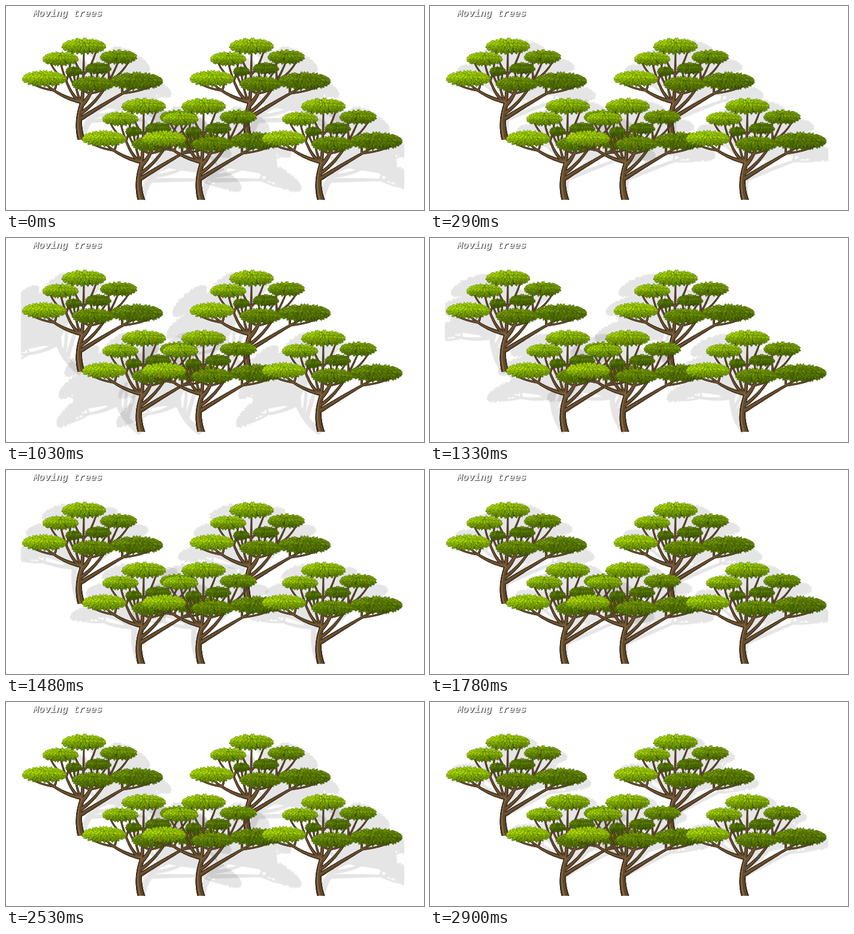
An HTML page with a canvas for the animation above (3000 ms loop, 698 by 340 pixels).

```html
<!DOCTYPE html>
<html lang="en">
<head>
<meta charset="utf-8">
<title>Moving trees</title>
<style>
  html, body { margin: 0; width: 698px; height: 340px; overflow: hidden; background: #fff; }
  canvas { display: block; }
</style>
</head>
<body>
<canvas id="stage" width="698" height="340"></canvas>
<script>
const W = 698, H = 340, LOOP = 3000;
const TREES = [[0, 0], [280, 0], [100, 100], [200, 100], [400, 100]];
const BASE = { x: 128, y: 222.5 }, CROTCH = { x: 128, y: 160 };

// Foliage from back to front; the five from index 2 run round the crown.
const CLUMPS = [
  [113, 109, 14, .36], [154, 104, 22, .36],
  [64, 121, 37, .98], [91, 88, 30, .86], [130, 67, 37, .84], [188, 85, 31, .58], [218, 125, 44, .42],
  [145, 130, 35, .5]
].map(([x, y, rx, bright]) => ({ x, y, rx, ry: rx * .23 + 5.5, bright }));

let seed = 7;
const random = () => (seed = seed * 16807 % 2147483647) / 2147483647;
const mix = (a, b, t) => a + (b - a) * t;

function layer() {
  const c = document.createElement('canvas');
  c.width = 290;
  c.height = 240;
  return c.getContext('2d');
}

const point = ({ from, via, to }, t) => ({
  x: mix(mix(from.x, via.x, t), mix(via.x, to.x, t), t),
  y: mix(mix(from.y, via.y, t), mix(via.y, to.y, t), t)
});

// A trunk, then one branch per clump, each ending in a fork of two twigs.
function growLimbs() {
  const trunk = { from: { x: 127, y: 226 }, via: { x: 116, y: 195 }, to: CROTCH, w0: 12, w1: 7 };
  const limbs = [trunk];
  for (const { x, y, rx, ry } of CLUMPS) {
    const reach = x - CROTCH.x;
    const branch = {
      from: { x: CROTCH.x - 2, y: CROTCH.y + Math.max(0, reach) * .3 },
      via: { x: CROTCH.x + reach * .6, y: CROTCH.y - 8 },
      to: { x, y: y + ry * .5 },
      w0: 2 + rx * .11, w1: 2.5
    };
    limbs.push(branch);
    for (const side of [-.55, .55]) {
      const from = point(branch, .7), to = { x: x + rx * side, y: y + ry * .6 };
      limbs.push({ from, via: { x: mix(from.x, to.x, .6), y: mix(from.y, to.y, .3) }, to, w0: 3, w1: 2 });
    }
  }
  return limbs;
}

function drawLimb(g, limb, colour, scale, grow, shift) {
  g.fillStyle = colour;
  for (let t = 0; t <= 1; t += .015) {
    const p = point(limb, t), w = mix(limb.w0, limb.w1, t);
    g.beginPath();
    g.arc(p.x + shift * w, p.y + shift * w * .3, w * scale / 2 + grow, 0, 7);
    g.fill();
  }
}

function leaf(g, x, y, angle, length, light) {
  g.save();
  g.translate(x, y);
  g.rotate(angle);
  g.beginPath();
  g.moveTo(-length * .5, 0);
  g.quadraticCurveTo(0, -length * .5, length * .5, 0);
  g.quadraticCurveTo(0, length * .5, -length * .5, 0);
  g.fillStyle = `hsl(${77 - light * 5}, 95%, ${13 + light * 31}%)`;
  g.strokeStyle = `hsl(80, 95%, ${9 + light * 18}%)`;
  g.lineWidth = .6;
  g.fill();
  g.stroke();
  g.restore();
}

// Rings of leaves pointing outwards, laid from the rim to the middle.
function drawClump(g, { x, y, rx, ry, bright }) {
  g.fillStyle = `hsl(80, 90%, ${10 + bright * 8}%)`;
  g.beginPath();
  g.ellipse(x, y, rx * .85, ry * .8, 0, 0, 7);
  g.fill();
  const length = 6 + ry * .25;
  for (let ring = 1; ring > -.01; ring -= .2) {
    const count = Math.max(2, Math.round(ring * (rx + ry) * .66));
    for (let i = 0; i < count; i++) {
      const a = (i + random() * .7) / count * Math.PI * 2;
      const dx = Math.cos(a) * ring, dy = Math.sin(a) * ring;
      const angle = Math.atan2(dy * .8 + .25, dx) + random() * .4 - .2;
      const light = bright * (.82 - dy * .42 - dx * .08) + random() * .14;
      leaf(g, x + dx * (rx - length * .45), y + dy * (ry - length * .45) - (1 - ring) * 1.5,
        angle, length, Math.min(1, light));
    }
  }
}

function makeTree() {
  const g = layer(), limbs = growLimbs();
  g.rect(0, 0, 290, 223);
  g.clip();
  limbs.forEach(l => drawLimb(g, l, '#3b2a18', 1, .3, 0));
  limbs.forEach(l => drawLimb(g, l, '#614a2d', .7, 0, 0));
  limbs.forEach(l => drawLimb(g, l, '#8a6c46', .2, 0, -.16));
  CLUMPS.forEach(c => drawClump(g, c));
  return g.canvas;
}

// The tree's silhouette with the inside of the crown closed.
function makeShadow(tree) {
  const g = layer();
  g.drawImage(tree, 0, 0);
  g.beginPath();
  [...CLUMPS.slice(2, 7), CROTCH].forEach(p => g.lineTo(p.x, p.y));
  g.fill();
  g.globalCompositeOperation = 'source-in';
  g.fillRect(0, 0, 290, 240);
  return g.canvas;
}

const tree = makeTree(), shadow = makeShadow(tree);
const ctx = document.getElementById('stage').getContext('2d');

// The picture advances in steps of about 150 ms.
const STEPS = Array.from({ length: 19 }, (_, k) => 150 * k - (k > 1) * 10 - (k > 5) * 10).concat(2900);

// Shadows swing to and fro at constant speed, in degrees.
function swing(t) {
  const half = 1265, phase = (t + 217) % (2 * half);
  return mix(-42.8, 45.5, Math.abs(phase / half - 1));
}

function draw(time) {
  const t = STEPS.filter(s => s <= time).pop();
  ctx.fillStyle = '#fff';
  ctx.fillRect(0, 0, W, H);
  ctx.save();
  ctx.beginPath();
  ctx.rect(25, 0, 640, H);
  ctx.clip();
  for (const [x, y] of TREES) {
    ctx.save();
    ctx.globalAlpha = .1;
    ctx.translate(x + BASE.x, y + BASE.y);
    ctx.rotate(swing(t) * Math.PI / 180);
    ctx.drawImage(shadow, -BASE.x, -BASE.y);
    ctx.restore();
  }
  for (const [x, y] of TREES) ctx.drawImage(tree, x, y);
  ctx.font = 'italic bold 16px "Liberation Mono", monospace';
  ctx.fillStyle = '#fff';
  ctx.shadowColor = '#333';
  ctx.shadowOffsetX = ctx.shadowOffsetY = 1;
  ctx.shadowBlur = 1;
  ctx.fillText('Moving trees', 45, 17);
  ctx.restore();
}

const start = performance.now();
function tick() {
  draw((performance.now() - start) % LOOP);
  requestAnimationFrame(tick);
}
tick();
</script>
</body>
</html>
```
